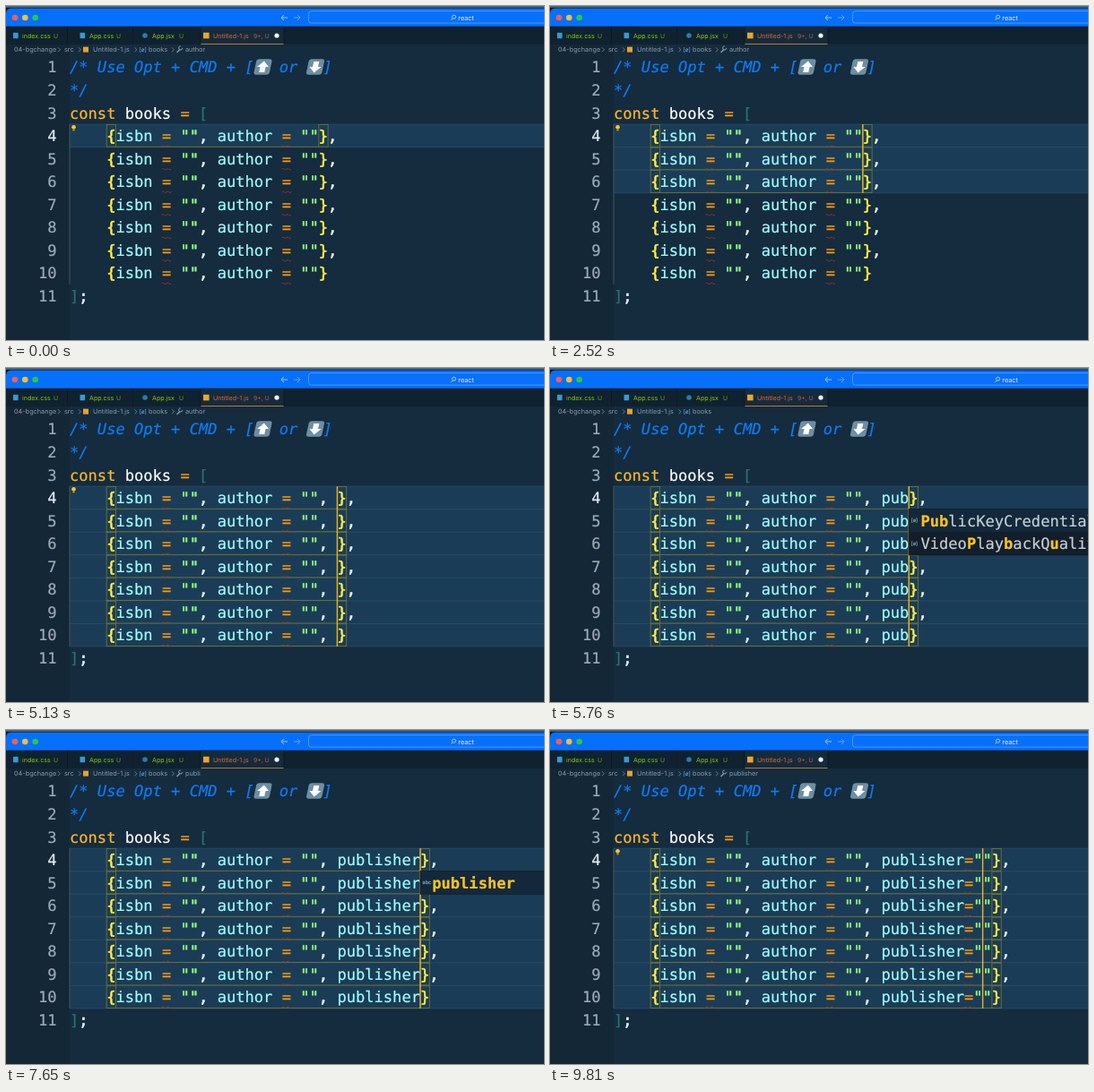
An HTML page for the animation above (9900 ms loop, 600 by 373 pixels).

```html
<!DOCTYPE html>
<html lang="en">
<head>
<meta charset="utf-8">
<title>Multi-cursor editing</title>
<style>
  html, body { margin: 0; height: 100%; overflow: hidden; background: #16293b; }
  svg { display: block; width: 100%; height: 100%; }
  text { white-space: pre; text-rendering: geometricPrecision; }
  text, tspan { fill: currentColor; }
  .code { font: 17.09px "DejaVu Sans Mono", monospace; }
  .code text, .code tspan { stroke: currentColor; stroke-width: .2; }
  .code .mark { stroke-width: .6; }
  .ui { font: 7.1px Inter, sans-serif; }
  .hit { font-weight: bold; color: #ffc321; }
</style>
</head>
<body>
<svg viewBox="0 0 600 373">
  <rect width="600" height="373" fill="#152b3e"/>
  <rect width="71" height="373" fill="#142736"/>
  <rect width="600" height="12" fill="#09131d"/>
  <rect width="600" height="1.8" fill="#50687a"/>
  <path d="M0 22.8V9Q0 2.6 6 2.6H600V22.8Z" fill="#0670fb"/>
  <g id="chrome" class="ui"></g>
  <g id="crumbs" class="ui"></g>
  <g id="editor" class="code"></g>
</svg>
<script>
const LOOP = 9900, LEFT = 71, CELL = 10.29, ROW = 25.55, BASE = 19, FIRST = 4, LAST = 10;
const $ = id => document.getElementById(id);
const colX = col => LEFT + col * CELL;
const rowY = line => 55.45 + (line - 1) * ROW;

const rect = (x, y, w, h, fill, extra = '') =>
  `<rect x="${x}" y="${y}" width="${w}" height="${h}" fill="${fill}" ${extra}/>`;
const dot = (x, y, r, fill) => `<circle cx="${x}" cy="${y}" r="${r}" fill="${fill}"/>`;
const stroke = (d, color, width = 1) =>
  `<path d="${d}" fill="none" stroke="${color}" stroke-width="${width}"/>`;
const text = (x, y, body, color, extra = '') =>
  `<text x="${x}" y="${y}" color="${color}" ${extra}>${body}</text>`;

// Keystrokes: [time, number of cursors, typed text]
const letterTimes = [5400, 5580, 5760, 5940, 6120, 6480, 6750, 7020, 7290];
const steps = [
  [-910, 1, ''], [1700, 2, ''], [2160, 3, ''], [2700, 4, ''], [3060, 5, ''],
  [3420, 6, ''], [4050, 7, ''], [4590, 7, ','], [4860, 7, ', '],
  ...letterTimes.map((time, i) => [time, 7, ', ' + 'publisher'.slice(0, i + 1)]),
  [8190, 7, ', publisher='], [8730, 7, ', publisher=""']
];

// Suggestions; asterisks enclose the matched letters
const suggestions = {
  p: ['*p*arent', '*p*arseFloat', '*p*arseInt', '*p*erformance', '*p*ostMessage',
    '*p*rint', '*p*rompt', '*P*romise', '*P*roxy'],
  pu: ['*Pu*blicKeyCredential', '*Pu*shManager', '*Pu*shSubscription', '*p*erformance',
    '*P*erformanceMeasure', '*p*rivate', '*P*opStateEvent', '*P*ointerEvent', '*P*rogressEvent'],
  pub: ['*Pub*licKeyCredential', 'Video*P*lay*b*ackQ*u*ality'],
  publ: ['*Publ*icKeyCredential', 'Video*P*lay*b*ackQ*u*a*l*ity'],
  publi: ['*Publi*cKeyCredential', 'Video*P*lay*b*ackQ*u*a*li*ty']
};

function tokenColor(token) {
  if (token === 'const') return '#ffb929';
  if (token === 'books') return '#ffffff';
  if (/\w/.test(token)) return '#9effff';
  return { '=': '#ff9a0a', '"': '#8ff57a', '{': '#fff047', '}': '#fff047',
    '[': '#2a716d', ']': '#2a716d' }[token[0]] || '#e8f3f8';
}

function codeLine(line, source) {
  const body = source.replace(/\w+|"+|[^\w\s"]/g, t =>
    `<tspan color="${tokenColor(t)}"${/[{}",;]/.test(t) ? ' class="mark"' : ''}>${t}</tspan>`);
  return text(LEFT, rowY(line) + BASE, body, '#fff');
}

function arrowKey(x, turn) {
  return `<g transform="translate(${x} 68) skewX(-12)">` +
    rect(-8.7, -8.7, 17.4, 17.4, '#6d8ea4', 'rx="3"') +
    `<path d="M0-6.5L6.5 0H3V6H-3V0H-6.5Z" fill="#fff" transform="rotate(${turn})"/></g>`;
}

function chrome() {
  const tab = (x, name, end) =>
    text(x, 35.7, name, '#74d012') + text(end, 35.7, 'U', '#5da51c', 'font-size="6.8"');
  return dot(10, 13, 3.3, '#ff5b51') + dot(21.3, 13, 3.3, '#fdbc2f') + dot(32.7, 13, 3.3, '#2bc840') +
    stroke('M314 13H307M310 10L307 13L310 16', '#a9ccff', .9) +
    stroke('M321 13H328M325 10L328 13L325 16', '#6ca9fa', .9) +
    rect(337.5, 5.6, 275, 13.5, '#0870fa', 'rx="3" stroke="#5ba3ff" stroke-width=".8"') +
    stroke('M501.6 12.2a2 2 0 1 0-4 0a2 2 0 1 0 4 0M498.2 13.7L496.4 15.6', '#e5f0ff', .7) +
    text(504.3, 15.5, 'react', '#f1f6ff', 'font-size="7.3"') +
    rect(0, 22.8, 600, 20.2, '#10212f') + rect(217, 22.8, 93, 20.2, '#152b3c') +
    rect(217, 42, 93, 1, '#b57632') +
    stroke('M68.5 23V43M141.5 23V43M217 23V43M310 23V43', '#0b1924', .8) +
    rect(8, 29.8, 5.6, 6.4, '#349bd1') + tab(18, 'index.css', 53) +
    rect(82.5, 29.8, 5.6, 6.4, '#349bd1') + tab(93, 'App.css', 123) +
    dot(155, 33, 2.8, '#277fa5') + tab(163, 'App.jsx', 193) +
    rect(220, 29.7, 6.6, 6.6, '#f0a52d') +
    text(231, 35.7, 'Untitled-1.js', '#e0653f') + text(276, 35.7, '9+, U', '#bf5c40', 'font-size="6.8"') +
    dot(302, 33, 2.6, '#f4f7f9');
}

function crumbs(symbol) {
  const gray = '#879bab', y = 51.3;
  const labels = [[9, '04-bgchange'], [65, 'src'], [97, 'Untitled-1.js'], [159, 'books']];
  if (symbol) labels.push([200, symbol]);
  const chevrons = symbol ? [58, 81, 143.5, 185] : [58, 81, 143.5];
  return labels.map(([x, s]) => text(x, y, s, gray, 'font-size="7.3"')).join('') +
    chevrons.map(x => stroke(`M${x} 46.3l2.4 2.5l-2.4 2.5`, gray, .7)).join('') +
    rect(86, 45.6, 6, 6, '#e7a02f') + text(148.5, y - .3, '[ø]', '#60b7ee', 'font-size="6.3"') +
    (symbol ? stroke('M190.5 52L194.2 48.3', gray, 1.5) +
      stroke('M196.8 46.8A2.1 2.1 0 1 1 194.8 44.8', gray, 1) : '');
}

function popup(col, word) {
  const items = suggestions[word] || [`*${word}*`];
  const x = colX(col), top = rowY(5), icon = suggestions[word] ? '[ø]' : 'abc';
  return rect(x, top, 601 - x, items.length * ROW, '#121e29', 'stroke="#0c1620"') +
    rect(x + .5, top, 600 - x, ROW, '#13283a') +
    items.map((item, i) => {
      const y = top + i * ROW + BASE;
      const body = item.split('*').map((s, k) => k % 2 ? `<tspan class="hit">${s}</tspan>` : s).join('');
      return text(x + 2.5, y - 4.5, icon, '#7ca6bb', 'class="ui" style="font-size:5.6px"') +
        text(x + 13.2, y, body, '#c3ced6');
    }).join('');
}

function editor(cursors, typed, caretOn) {
  const word = /^, (p\w*)$/.exec(typed)?.[1];
  const close = 27 + typed.length;
  const caretCol = close - typed.endsWith('"');
  const equals = typed.includes('=') ? [10, 23, 38] : [10, 23];
  const bottom = rowY(FIRST + cursors), olive = '#78782f';
  let out = rect(LEFT, rowY(FIRST), 600 - LEFT, cursors * ROW, '#1b3c56');
  for (let n = 0; n <= cursors; n++)
    out += rect(LEFT, rowY(FIRST + n) - .4, 600 - LEFT, .8, '#24506d');
  out += rect(LEFT - .4, rowY(FIRST), .8, 7 * ROW, '#526255');

  for (let line = 1; line <= 11; line++)
    out += text(56.5, rowY(line) + BASE, line, line === FIRST ? '#e2e9ee' : '#9eabb5', 'text-anchor="end"');
  const comment = (x, line, s) => text(x, rowY(line) + BASE, s, '#0c7df5', 'font-style="italic"');
  out += comment(LEFT, 1, '/* Use Opt + CMD + [') + arrowKey(286.5, 0) +
    comment(294.5, 1, ' or ') + arrowKey(345, 180) + comment(353.5, 1, ']') + comment(LEFT, 2, '*/') +
    codeLine(3, 'const books = [') + codeLine(11, '];');

  for (let line = FIRST; line <= LAST; line++) {
    const y = rowY(line), active = line < FIRST + cursors;
    if (active) {
      for (const col of [4, close])
        out += rect(colX(col), y + .4, CELL, ROW - .8, 'none', `stroke="${olive}" stroke-width=".8"`);
      out += rect(colX(5), y + ROW - .8, colX(close) - colX(5), .8, olive);
    }
    out += codeLine(line, `    {isbn = "", author = ""${typed}}${line < LAST ? ',' : ''}`);
    for (const col of equals)
      out += stroke(`M${colX(col)} ${y + ROW - 1}q1.3-1.6 2.6 0t2.6 0t2.6 0t2.6 0`, '#a33a29', .8);
  }
  if (caretOn) out += rect(colX(caretCol) - .7, rowY(FIRST), 1.4, bottom - rowY(FIRST), '#eab52c');
  out += word ? popup(caretCol, word)
    : dot(75.5, 135.3, 2.3, '#ffc928') + rect(74.4, 137.5, 2.2, 1.8, '#d39c22');
  return out;
}

function symbolAt(t) {
  if (t < 5400) return 'author';
  if (t < 6900) return '';
  return t < 8000 ? 'publi' : 'publisher';
}

let shown;
function draw() {
  const t = performance.now() % LOOP;
  const [start, cursors, typed] = steps.findLast(step => step[0] <= t);
  const caretOn = (t - start) % 1000 < 500;
  const symbol = symbolAt(t);
  const state = [start, caretOn, symbol].join();
  if (state !== shown) {
    shown = state;
    $('crumbs').innerHTML = crumbs(symbol);
    $('editor').innerHTML = editor(cursors, typed, caretOn);
  }
  requestAnimationFrame(draw);
}

$('chrome').innerHTML = chrome();
draw();
</script>
</body>
</html>
```
